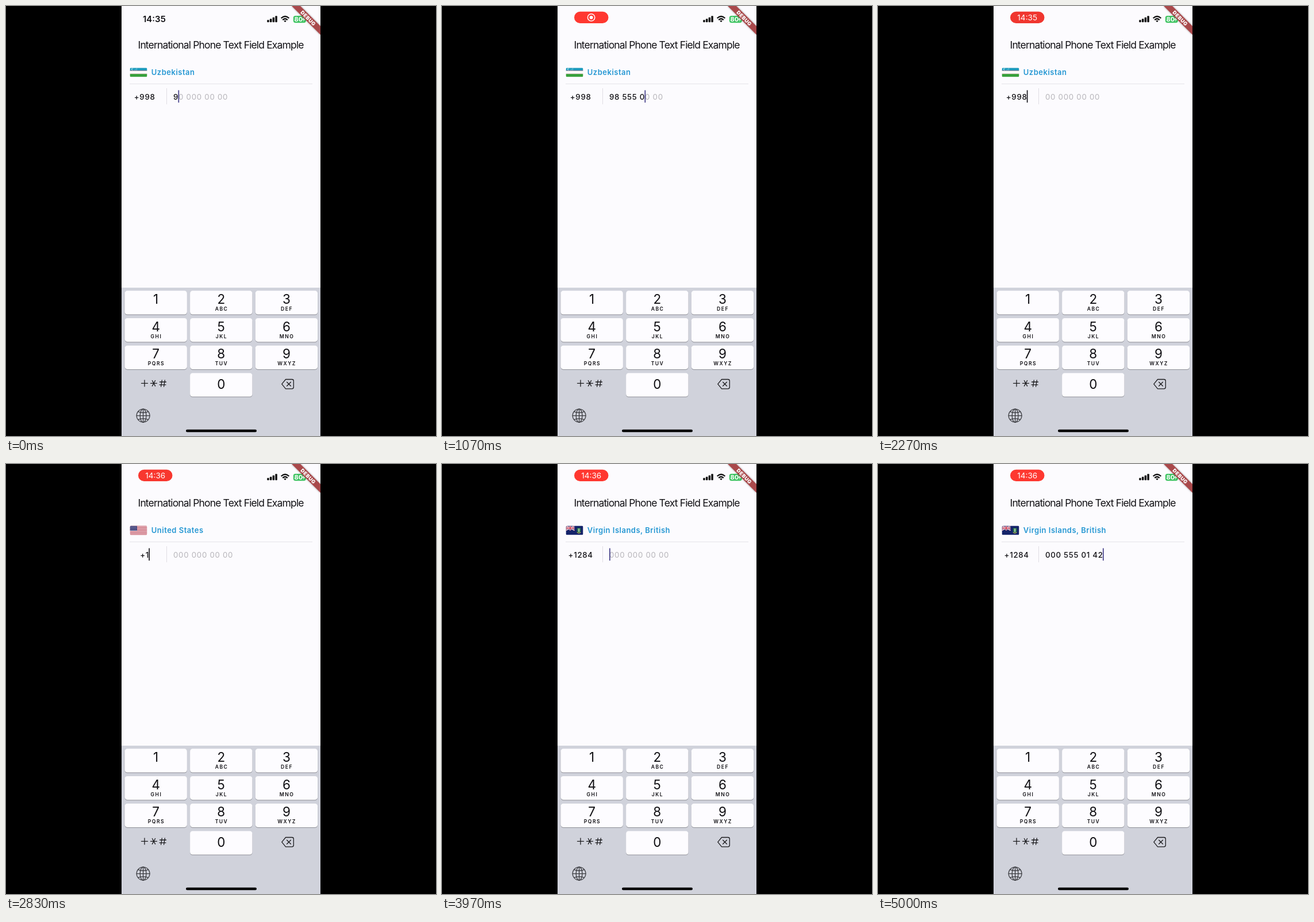
An HTML page that plays this animation: 748 px wide and 748 px high, repeating every 5.03 s.

```html
<!DOCTYPE html>
<html lang="en">
<head>
<meta charset="utf-8">
<title>Phone field</title>
<style>
  html, body { margin: 0; width: 100%; height: 100%; overflow: hidden; background: #000; }
  svg { display: block; width: 748px; height: 748px; }
  text { font-family: Inter, Roboto, sans-serif; fill: #111014; white-space: pre; }
  .mid { text-anchor: middle; }
  .title { font-size: 17.5px; letter-spacing: -.85px; }
  .country { font-size: 13px; font-weight: 600; letter-spacing: .5px; fill: #2597d3; }
  .num { font-size: 13.3px; font-weight: 500; letter-spacing: .7px; }
  .hint { fill: #b7b5ba; font-weight: 400; }
  .digit { font-size: 22.5px; }
  .sub { font-size: 8.6px; font-weight: 600; letter-spacing: 1.5px; }
  .line { fill: none; stroke: #1c1c1f; stroke-width: 1.3; stroke-linecap: round; stroke-linejoin: round; }
</style>
</head>
<body>
<svg viewBox="0 0 748 748">
  <defs>
    <clipPath id="screen"><rect x="201" width="346" height="748"/></clipPath>
    <clipPath id="flagBox"><rect width="30" height="16" rx="2"/></clipPath>
    <filter id="soft" x="-30%" y="-30%" width="160%" height="160%">
      <feDropShadow dx="0" dy="0" stdDeviation="1.8" flood-opacity=".45"/>
    </filter>
  </defs>
  <rect width="748" height="748"/>
  <g clip-path="url(#screen)">
    <rect x="201" width="346" height="748" fill="#fcfbfe"/>

    <text id="plainClock" x="238" y="28.3" font-size="15" font-weight="600">14:35</text>
    <g id="pill">
      <rect id="pillBox" x="230" y="9.8" width="59.5" height="20.2" rx="10.1"/>
      <g id="recIcon">
        <circle cx="259.6" cy="19.9" r="6.2" fill="none" stroke="#fff" stroke-width="1.5"/>
        <circle cx="259.6" cy="19.9" r="3" fill="#fff"/>
      </g>
      <text id="pillClock" class="mid" x="259.7" y="24.8" font-size="13.6" style="fill:#fff"></text>
    </g>

    <g id="bars" fill="#111"></g>
    <g fill="none" stroke="#111" stroke-width="2.2">
      <path d="M478.6 21.2Q485.5 14.8 492.4 21.2"/>
      <path d="M481.2 24.2Q485.5 20.3 489.8 24.2"/>
      <path d="M485.5 28.2L483.2 25.8Q485.5 24 487.8 25.8Z" fill="#111" stroke="none"/>
    </g>
    <rect x="499.8" y="17" width="22" height="12.2" rx="3.6" fill="#40c463"/>
    <text x="501.5" y="27.1" font-size="11" font-weight="700" style="fill:#fff">80</text>
    <path d="M518.6 18.8L515.6 23.8H517.8L517 27.4L520.4 22.4H518.2Z" fill="#fff"/>
    <path d="M497 0H512L547 35V50Z" fill="#a9494c" filter="url(#soft)"/>
    <text class="mid" transform="translate(525.7 21.3) rotate(45)" y="3.2" font-size="8.8"
      font-weight="900" letter-spacing=".5" style="fill:#fff">DEBUG</text>

    <text class="title mid" x="373.6" y="74">International Phone Text Field Example</text>

    <g transform="translate(215.5 107.4)"><g id="flags" clip-path="url(#flagBox)"></g></g>
    <text id="country" class="country" x="252.8" y="119.8"></text>
    <path d="M215 135.5H533" stroke="#e5e3e8"/>
    <path d="M279.5 143V171" stroke="#e0dde4"/>
    <text id="code" class="num mid" x="241.2" y="163"></text>
    <text class="num" x="291" y="163"><tspan id="typed"></tspan><tspan id="rest" class="hint"></tspan></text>
    <rect id="caret" y="146.5" width="1.7" height="21.5"/>

    <rect x="201" y="490" width="346" height="258" fill="#d0d2db"/>
    <g id="keys"></g>
    <g class="line">
      <path d="M235.5 656.3H246.5M241 650.8V661.8"/>
      <path d="M251.5 656.3H262.5M254.4 651.5L259.6 661.1M259.6 651.5L254.4 661.1"/>
      <path d="M267.5 654H278.5M267 658.8H278M271.3 651L269.6 662M276.3 651L274.6 662"/>
      <path d="M486.5 649.5H497.5Q500.3 649.5 500.3 652.3V663Q500.3 665.8 497.5 665.8H486.5L479.8 657.7Z"/>
      <path d="M488.6 654.2L495.4 661M495.4 654.2L488.6 661"/>
    </g>
    <g class="line" style="stroke:#3c3d42">
      <circle cx="238.6" cy="712.6" r="11.4"/>
      <ellipse cx="238.6" cy="712.6" rx="5.4" ry="11.4"/>
      <path d="M238.6 701.2V724M227.2 712.6H250M229.8 705.6Q238.6 709.4 247.4 705.6M229.8 719.6Q238.6 715.8 247.4 719.6"/>
    </g>
    <rect x="313" y="736.8" width="123" height="4.4" rx="2.2"/>
  </g>
</svg>
<script>
const LOOP = 5030;
const $ = id => document.getElementById(id);
const show = (el, on) => el.setAttribute('visibility', on ? 'inherit' : 'hidden');
const rect = (x, y, w, h, fill, rx = 0) =>
  `<rect x="${x}" y="${y}" width="${w}" height="${h}" rx="${rx}" fill="${fill}"/>`;

// static parts
$('bars').innerHTML = [4, 6, 8.4, 11].map((h, i) =>
  rect(454.2 + i * 4.7, 28.2 - h, 3.5, h, '#111', 1)).join('');

const SUBS = ['', 'ABC', 'DEF', 'GHI', 'JKL', 'MNO', 'PQRS', 'TUV', 'WXYZ'];
function key(label, sub, col, row) {
  const x = 206.5 + col * 113.6, y = 495.3 + row * 47.7, mid = x + 54.2;
  return rect(x, y + 1, 108.4, 41.2, '#8f9097', 4.6) +
    rect(x, y, 108.4, 41.2, '#fdfcff', 4.6) +
    `<text class="digit mid" x="${mid}" y="${y + (label ? 22.6 : 27.4)}">${label}</text>` +
    `<text class="sub mid" x="${mid + .7}" y="${y + 34.6}">${sub}</text>`;
}
$('keys').innerHTML = SUBS.map((s, i) => key(i + 1, s, i % 3, Math.floor(i / 3))).join('') +
  key(0, '', 1, 3);

function uzFlag() {
  const dots = [[8, 4], [10, 4], [10, 2.6], [12, 4], [12, 2.6], [12, 1.3]]
    .map(([x, y]) => `<circle cx="${x}" cy="${y}" r=".45" fill="#fff"/>`).join('');
  return rect(0, 0, 30, 16, '#fbfafc') + rect(0, 0, 30, 5.3, '#209bbd') +
    rect(0, 5.1, 30, .5, '#c9545c') + rect(0, 10.4, 30, .5, '#c9545c') +
    rect(0, 10.8, 30, 5.2, '#37a03b') +
    '<circle cx="4.5" cy="2.7" r="1.8" fill="#fff"/><circle cx="5.2" cy="2.7" r="1.6" fill="#209bbd"/>' + dots;
}
function usFlag() {
  let s = rect(0, 0, 30, 16, '#f7f3f6');
  for (let i = 0; i < 13; i += 2) s += rect(0, i * 16 / 13, 30, 16 / 13, '#bd3b4e');
  s += rect(0, 0, 12.5, 8.6, '#41427c');
  for (let r = 0; r < 5; r++)
    for (let c = 0; c < 6 - r % 2; c++)
      s += `<circle cx="${1.2 + c * 2 + r % 2}" cy="${1.2 + r * 1.55}" r=".36" fill="#fff"/>`;
  return s;
}
function bviFlag() {
  const cross = (d, color, w) => `<path d="${d}" stroke="${color}" stroke-width="${w}"/>`;
  const diag = 'M0 0L15 8M15 0L0 8', plus = 'M7.5 0V8M0 4H15';
  return rect(0, 0, 30, 16, '#14236a') +
    cross(diag, '#fff', 1.8) + cross(diag, '#c8304a', .7) +
    cross(plus, '#fff', 2.7) + cross(plus, '#c8304a', 1.5) +
    '<path d="M19.5 4H25.8V8.5Q25.8 11.6 22.6 12.6Q19.5 11.6 19.5 8.5Z" fill="#2f8050"/>' +
    rect(22, 5, 1.3, 5.6, '#f3e8d8') +
    '<path d="M19.2 11.6Q22.6 14.6 26 11.6" fill="none" stroke="#e5c04a" stroke-width="1"/>';
}
const FLAGS = [uzFlag, usFlag, bviFlag];
$('flags').innerHTML = FLAGS.map(f => `<g>${f()}</g>`).join('');
const flagEls = [...$('flags').children];
const NAMES = ['Uzbekistan', 'United States', 'Virgin Islands, British'];
const MASKS = ['00 000 00 00', '000 000 00 00', '000 000 00 00'];

// each step: [time, changed state]
const steps = [[0, { digits: '9', code: '+998', place: 0, inCode: false }]];
const type = (field, start, gap, values) =>
  values.forEach((v, i) => steps.push([start + i * gap, { [field]: v }]));
const prefixes = (s, from) =>
  Array.from({ length: s.length - from }, (_, i) => s.slice(0, from + i + 1));

const first = '985550246', second = '0005550142';
type('digits', 620, 95, prefixes(first, 1));
type('digits', 1620, 55, ['', ...prefixes(first, 0)].slice(0, -1).reverse());
steps.push([2180, { inCode: true }]);
type('code', 2380, 80, ['+99', '+9', '+']);
steps.push([2700, { code: '+1', place: 1 }]);
type('code', 3480, 100, ['+12', '+128']);
steps.push([3680, { code: '+1284', place: 2 }]);
steps.push([3900, { inCode: false }]);
type('digits', 4080, 90, prefixes(second, 0));

function stateAt(t) {
  const s = { last: 0 };
  for (const [at, change] of steps) if (at <= t) Object.assign(s, change, { last: at });
  return s;
}

function format(mask, digits) {
  let out = '', i = 0;
  for (const ch of mask) {
    if (i >= digits.length) break;
    out += ch === ' ' ? ' ' : digits[i++];
  }
  return out;
}

// on, quick fade out, off, quick fade in
function blink(age) {
  const p = age % 400;
  if (p < 150) return 1;
  if (p < 190) return (190 - p) / 40;
  return p < 360 ? 0 : (p - 360) / 40;
}

function drawPill(t) {
  const recording = t >= 300, clock = t >= 2000;
  show($('plainClock'), !recording);
  show($('pill'), recording);
  show($('recIcon'), recording && !clock);
  $('pillClock').textContent = !clock ? '' : t < 2600 ? '14:35' : '14:36';
  const glow = ((1 + Math.cos((t - 3975) / 980 * 2 * Math.PI)) / 2) ** .6;
  $('pillBox').setAttribute('fill', `rgb(${214 + 41 * glow},${51 + 5 * glow},${44 + 4 * glow})`);
}

function draw(t) {
  const s = stateAt(t), mask = MASKS[s.place], typed = format(mask, s.digits);
  drawPill(t);
  flagEls.forEach((el, i) => show(el, i === s.place));
  $('country').textContent = NAMES[s.place];
  $('code').textContent = s.code;
  $('typed').textContent = typed;
  $('rest').textContent = mask.slice(typed.length);
  const x = s.inCode
    ? 241.2 + $('code').getComputedTextLength() / 2 - .8
    : 291 + (typed ? $('typed').getComputedTextLength() - .6 : 0);
  $('caret').setAttribute('x', x);
  $('caret').setAttribute('fill', s.inCode ? '#1b1a20' : '#45408a');
  $('caret').setAttribute('opacity', blink(t - s.last));
}

const start = performance.now();
function tick() {
  draw((performance.now() - start) % LOOP);
  requestAnimationFrame(tick);
}
tick();
</script>
</body>
</html>
```
